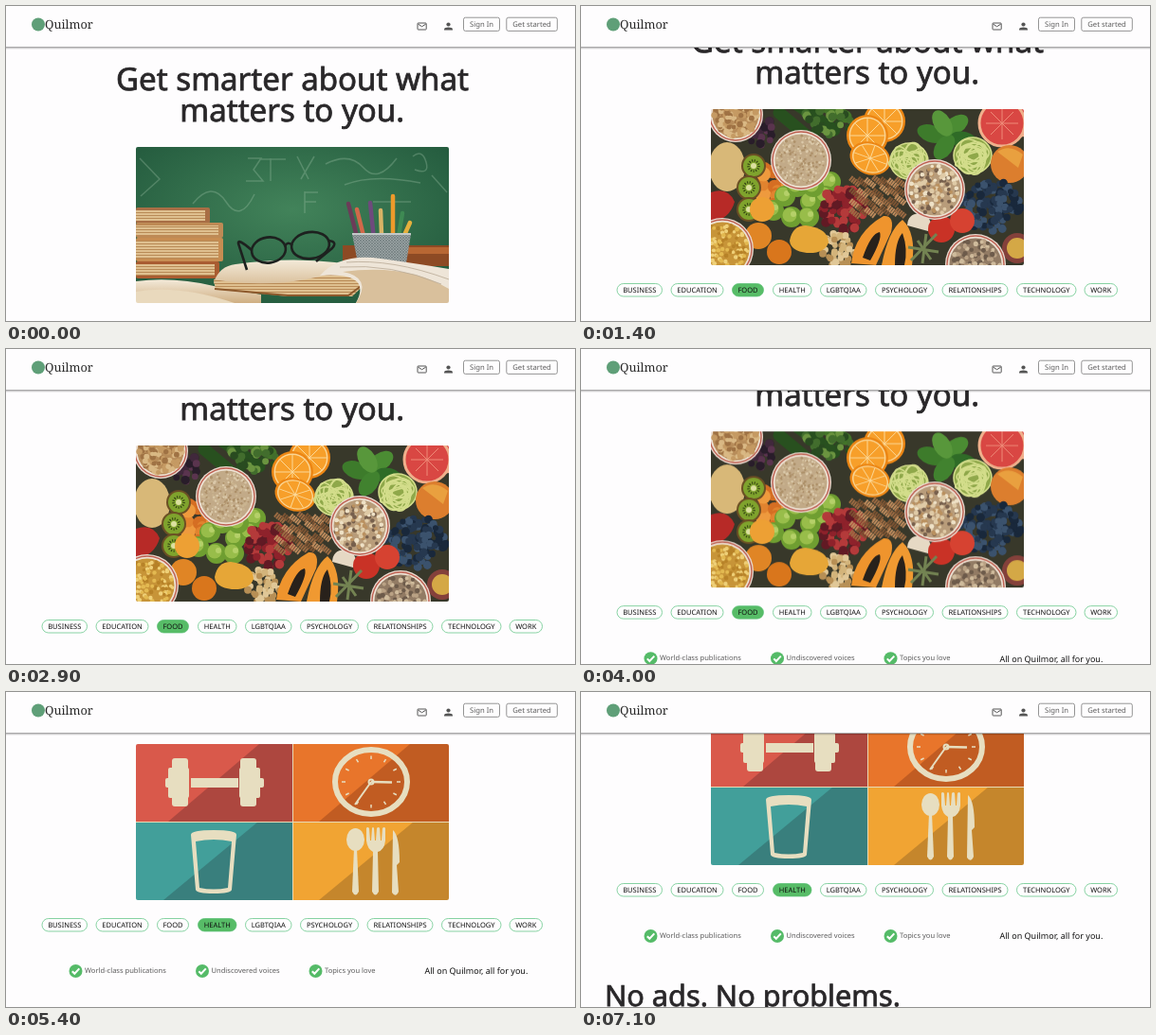
An HTML page that plays this animation: 600x333 px, repeating every 7.2 s.

```html
<!DOCTYPE html>
<html lang="en">
<head>
<meta charset="utf-8">
<title>Quilmor</title>
<style>
html, body { margin: 0; width: 100%; height: 100%; overflow: hidden; background: #fefdfe; }
svg { display: block; width: 100vw; height: 100vh; }
text { font-family: "Noto Sans", sans-serif; text-rendering: geometricPrecision; }
.title { font-size: 33.1px; fill: #292729; stroke: #292729; stroke-width: .75px; }
.mid { text-anchor: middle; }
.small { font-size: 7.56px; fill: #5c5c5c; }
.btn { fill: none; stroke: #888; stroke-width: .9px; }
.page { animation: scroll 7200ms infinite; }
.slide { animation: 7200ms step-end infinite; }
.education { animation-name: education; }
.food { animation-name: food; visibility: hidden; }
.health { animation-name: health; visibility: hidden; }
@keyframes education { 0% { visibility: visible; } 13.889%, 100% { visibility: hidden; } }
@keyframes food { 0% { visibility: hidden; } 13.889% { visibility: visible; } 69.444%, 100% { visibility: hidden; } }
@keyframes health { 0% { visibility: hidden; } 69.444%, 100% { visibility: visible; } }
@keyframes scroll {
  0% { transform: translateY(0); animation-timing-function: steps(9); }
  12.5% { transform: translateY(-36px); animation-timing-function: steps(4); }
  18.055% { transform: translateY(-40px); animation-timing-function: steps(4); }
  23.611% { transform: translateY(-40px); animation-timing-function: steps(7); }
  33.333% { transform: translateY(-47px); animation-timing-function: steps(8); }
  44.444% { transform: translateY(-47px); animation-timing-function: steps(7); }
  54.166% { transform: translateY(-60px); animation-timing-function: steps(6); }
  62.499% { transform: translateY(-71px); animation-timing-function: steps(4); }
  68.055% { transform: translateY(-80px); animation-timing-function: steps(5); }
  74.999% { transform: translateY(-94px); animation-timing-function: steps(10); }
  88.888% { transform: translateY(-117px); animation-timing-function: steps(7); }
  98.61%, 100% { transform: translateY(-131px); }
}
</style>
</head>
<body>
<svg viewBox="0 0 600 333" preserveAspectRatio="none">
  <defs>
    <clipPath id="frame"><rect width="330" height="165" rx="2"/></clipPath>
    <radialGradient id="board" cx=".5" cy=".4" r=".65">
      <stop offset="0" stop-color="#42835a"/><stop offset="1" stop-color="#245b3e"/>
    </radialGradient>
    <linearGradient id="paper" x2="0" y2="1">
      <stop offset="0" stop-color="#f3ead9"/><stop offset="1" stop-color="#cfae82"/>
    </linearGradient>
    <pattern id="edges" width="8" height="3" patternUnits="userSpaceOnUse">
      <rect width="8" height="3" fill="#dfc090"/><rect width="8" height="1" fill="#b88a56"/>
    </pattern>
    <pattern id="mesh" width="3" height="3" patternUnits="userSpaceOnUse">
      <rect width="3" height="3" fill="#9aa3a4"/><path d="M0 0L3 3M3 0L0 3" stroke="#697577" stroke-width=".6"/>
    </pattern>
    <g id="orange">
      <circle r="22" fill="#ec8614"/><circle r="19.5" fill="#fbd592"/><circle r="18" fill="#f79f2a"/>
      <path d="M-18 0H18M0-18V18M-12.7-12.7L12.7 12.7M12.7-12.7L-12.7 12.7" stroke="#fcd998"/>
    </g>
    <g id="kiwi"><circle r="13" fill="#6b4f24"/><circle r="11" fill="#7fa32d"/><circle r="5.5" fill="none" stroke="#2f3c12" stroke-width="2.5" stroke-dasharray="1 1.6"/><circle r="3" fill="#dbe0a0"/></g>
    <g id="check"><circle r="7" fill="#55bb68"/><path d="M-3.7 .2L-1.2 2.8L3.8-2.6" fill="none" stroke="#fff" stroke-width="2"/></g>
  </defs>

  <rect width="600" height="333" fill="#fefdfe"/>
  <g class="page">
    <text class="title mid" x="302" y="89">Get smarter about what</text>
    <text class="title mid" x="301.700" y="122">matters to you.</text>

    <g transform="translate(137 149)"><g clip-path="url(#frame)">
      <g class="slide education">
        <rect width="330" height="165" fill="url(#board)"/>
        <g fill="none" stroke="#a9c9b0" stroke-width="1.5" opacity=".3">
          <path d="M4 12L25 34L5 52M118 12H132L124 24L134 36H116M142 12V36M132 13H158M170 10L182 34M188 10L174 34M178 48H192M178 58H190M178 47V70M60 60Q80 35 95 58T125 50M200 18Q225 5 240 22T275 12M220 40Q250 28 300 38M292 10Q302 2 306 16T294 24M312 30L328 48M250 58H290"/>
        </g>
        <path d="M218 104H330V126H218Z" fill="#8d4a24"/>
        <path d="M283 106H330V113H283Z" fill="#b86733"/>
        <g id="stack"></g>
        <g id="pencils" stroke-width="4.5" stroke-linecap="round"></g>
        <path d="M228 92H290L285 123H234Z" fill="url(#mesh)"/>
        <path d="M228 92H290" stroke="#c3c9c8" stroke-width="2"/>
        <path d="M0 142Q40 137 82 147L132 156V165H0Z" fill="url(#paper)"/>
        <path d="M0 153Q45 145 104 165H0Z" fill="#e9d9bd"/>
        <path d="M82 143Q88 126 105 124Q160 116 210 122L260 132L200 156L85 151Z" fill="url(#paper)"/>
        <path d="M82 140Q140 150 194 137Q224 127 254 133L228 158H160L84 150Z" fill="url(#edges)"/>
        <path d="M83 150L160 157H224L252 136" fill="none" stroke="#8d592c" stroke-width="2"/>
        <path d="M194 136Q215 112 258 118T330 129V165H232Q250 132 194 136Z" fill="#eee5d8"/>
        <path d="M232 165Q250 138 218 132Q285 123 330 150V165Z" fill="#d9c09c"/>
        <path d="M222 122Q270 118 330 140M215 127Q270 123 322 145" fill="none" stroke="#b9aa96" stroke-width=".8"/>
        <g fill="none" stroke="#1d211f" stroke-width="2.6">
          <ellipse cx="140" cy="109" rx="18" ry="13.5" transform="rotate(-8 140 109)"/>
          <ellipse cx="184" cy="104" rx="20" ry="14" transform="rotate(-8 184 104)"/>
          <path d="M157 105Q160 99 165 104M122 109Q107 96 108 102L117 130M203 99Q213 100 207 107L190 121"/>
        </g>
      </g>

      <g class="slide food">
        <rect width="330" height="165" fill="#38382a"/>
        <g stroke-linecap="round" stroke-width="13">
          <path d="M72 4L108 34M92-4L130 22" stroke="#28501f"/><path d="M115-6L142 8" stroke="#437429"/>
        </g>
        <g id="leaves"></g>
        <g id="greens"></g>
        <ellipse cx="17" cy="61" rx="19" ry="26" fill="#d8b878"/>
        <g id="carrots"></g>
        <use href="#kiwi" x="45" y="60"/><use href="#kiwi" x="40" y="83"/><use href="#kiwi" x="40" y="106"/>
        <path d="M0 88Q18 82 25 98Q20 116 0 120Z" fill="#b72a27"/>
        <use href="#orange" x="183" y="13"/><use href="#orange" x="165" y="28"/><use href="#orange" transform="translate(168 52) rotate(20) scale(1 .78)"/>
        <g id="nests" fill="none" stroke="#d3dd8b" stroke-width="1.600"></g>
        <g stroke="#f0b08c" stroke-width="3" fill="#d94743">
          <circle cx="326" cy="5" r="23"/><circle cx="307" cy="15" r="24"/>
        </g>
        <path d="M290 15H324M307 0V32M295 3L319 27M319 3L295 27" stroke="#ef8b78"/>
        <circle cx="315" cy="58" r="20" fill="#dc7e2e"/><path d="M302 45Q315 36 329 48L324 62Z" fill="#e9a03f"/>
        <g id="clusters"></g>
        <path d="M83 139Q86 123 100 123Q124 126 124 141Q120 153 101 152Q84 150 83 139Z" fill="#e6a637"/>
        <path d="M148 163Q152 130 182 113Q194 112 190 130L174 165Z" fill="#ef942d"/>
        <path d="M180 165Q187 128 202 117Q217 131 212 165Z" fill="#f09931"/>
        <path d="M160 157Q169 131 178 130Q181 137 168 160ZM194 165Q194 140 202 131Q208 148 204 165Z" fill="#28211b"/>
        <circle cx="54" cy="106" r="13" fill="#eda034"/><circle cx="50" cy="134" r="14" fill="#e08525"/><circle cx="72" cy="151" r="13" fill="#d9761c"/>
        <path d="M207 123Q208 108 224 111Q237 119 229 129Z" fill="#e6d9c4"/>
        <circle cx="243" cy="127" r="14" fill="#c93226"/><circle cx="265" cy="118" r="13" fill="#d64231"/>
        <path d="M211 160L238 132M218 139L232 159M208 146L240 151M227 132L223 163" stroke="#738352" stroke-width="3"/>
        <circle cx="323" cy="147" r="16" fill="#84413b"/><circle cx="323" cy="147" r="11" fill="#d4a846"/>
        <g id="bowls"></g>
      </g>

      <g class="slide health">
        <path d="M0 0H165V82H0Z" fill="#d9594b"/><path d="M34 82L130 0H165V82Z" fill="#ad473f"/>
        <path d="M165 0H330V82H165Z" fill="#e8752b"/><path d="M193 82L289 0H330V82Z" fill="#c15c22"/>
        <path d="M0 82H165V165H0Z" fill="#429f9a"/><path d="M29 165L129 82H165V165Z" fill="#397f7d"/>
        <path d="M165 82H330V165H165Z" fill="#f1a433"/><path d="M193 165L293 82H330V165Z" fill="#c5862c"/>
        <path d="M165.5 0V165M0 82.5H330" stroke="#e8d9b4"/>
        <g fill="#e7dec0">
          <rect x="38" y="15" width="17" height="51" rx="3"/><rect x="34" y="25" width="22" height="32" rx="2"/><rect x="31" y="36" width="6" height="10" rx="2"/>
          <rect x="58" y="36" width="50" height="10"/>
          <rect x="110" y="15" width="17" height="51" rx="3"/><rect x="109" y="25" width="22" height="32" rx="2"/><rect x="129" y="36" width="6" height="10" rx="2"/>
          <path d="M58 96Q58 91 82 91T106 96L101 154Q100 158 82 158T63 154ZM63 103L67 152Q82 155 97 152L101 103Q82 99 63 103Z" fill-rule="evenodd"/>
          <ellipse cx="231.500" cy="101" rx="9.500" ry="12"/><path d="M230 110H233L235 156Q231.500 163 228 156Z"/>
          <path d="M243 89Q244 87 246 89L247 102H248L249 89Q250 87 251 89L252 102H253L254 89Q256 87 257 89L258 102H259L260 89Q262 87 263 89V102Q262 112 255 114L256 156Q252.500 163 249 156L250 114Q244 111 243 102Z"/>
          <path d="M271 91Q278 97 278 125L275 128L277 156Q274 163 270 157Z"/>
        </g>
        <g fill="none" stroke="#e7dec0">
          <ellipse cx="248" cy="40" rx="38" ry="34" stroke-width="6"/>
          <g id="ticks" stroke-width="1.500"></g>
          <path d="M248 40L270 40.500" stroke-width="2.500"/><path d="M248 40L231 64" stroke-width="2"/>
          <circle cx="248" cy="40" r="2.500" stroke-width="2"/>
        </g>
      </g>
    </g></g>

    <g id="pills"></g>
    <g id="perks"></g>
    <text x="441.500" y="392.400" font-size="9" fill="#111">All on Quilmor, all for you.</text>
    <text class="title" x="25" y="463" style="font-size:30.700px">No ads. No problems.</text>
  </g>

  <rect y="43" width="600" height="3" fill="#000" opacity=".06"/>
  <rect y="43" width="600" height="2" fill="#000" opacity=".14"/>
  <rect y="43" width="600" height="1" fill="#aaa"/>
  <rect width="600" height="43" fill="#fefdfe"/>
  <circle cx="34" cy="19.500" r="7" fill="#5f9f78"/>
  <text x="41" y="24" style="font:12.700px 'Noto Serif',serif" fill="#292929">Quilmor</text>
  <g fill="none" stroke="#555">
    <rect x="434" y="18" width="9.200" height="7" rx=".7"/><path d="M434.500 19L438.600 21.800L442.800 19"/>
  </g>
  <path d="M462 25.500V24.400Q462.500 22.500 466.500 22.500T471 24.400V25.500Z" fill="#555"/><circle cx="466.500" cy="19.500" r="2.100" fill="#555"/>
  <rect class="btn" x="482.500" y="12.200" width="38" height="14.200" rx="2"/>
  <rect class="btn" x="527.800" y="12.200" width="53.500" height="14.200" rx="2"/>
  <text class="small mid" x="501.500" y="22" style="font-size:7.700px">Sign In</text>
  <text class="small mid" x="554.500" y="22" style="font-size:7.700px">Get started</text>
</svg>
<script>
const put = (id, html) => { document.getElementById(id).innerHTML += html; };
const dot = (x, y, r, fill) => `<circle cx="${x}" cy="${y}" r="${r}" fill="${fill}"/>`;
let seed = 7;
const rand = () => (seed = seed * 16807 % 2147483647) / 2147483647;

// Random dots spread evenly over an ellipse
function scatter(id, cx, cy, rx, ry, count, size, colors) {
  let out = '';
  for (let i = 0; i < count; i++) {
    const a = rand() * Math.PI * 2, d = Math.sqrt(rand());
    const fill = colors[i % colors.length];
    out += dot((cx + Math.cos(a) * d * rx).toFixed(1), (cy + Math.sin(a) * d * ry).toFixed(1), size * (.8 + rand() * .4), fill);
  }
  put(id, out);
}

function pill(label, x, right) {
  const box = `x="${x}" y="333.500" width="${right - x}" height="13.500" rx="6.750"`;
  const slides = ['EDUCATION', 'FOOD', 'HEALTH'];
  const active = slides.includes(label) ? `<rect ${box} fill="#57bc67" class="slide ${label.toLowerCase()}"/>` : '';
  put('pills', `<rect ${box} fill="#fefdfe" stroke="#86d2a2"/>${active}
    <text class="mid" x="${(x + right) / 2}" y="343" font-size="7.500" fill="#111">${label}</text>`);
}
[['BUSINESS', 38, 85.5], ['EDUCATION', 95, 150], ['FOOD', 159.5, 192.5], ['HEALTH', 202.5, 243],
 ['LGBTQIAA', 252.5, 301], ['PSYCHOLOGY', 310.5, 371.5], ['RELATIONSHIPS', 381, 450],
 ['TECHNOLOGY', 459.5, 522], ['WORK', 531, 565.5]].forEach(p => pill(...p));

[['World-class publications', 73.5], ['Undiscovered voices', 207], ['Topics you love', 326.5]].forEach(([label, x]) =>
  put('perks', `<use href="#check" x="${x}" y="389"/><text class="small" x="${x + 9.5}" y="391.300">${label}</text>`));

[[64, 78, 17, '#a86e45'], [80, 92, 16, '#be8a55'], [96, 92, 25, '#c78d52'], [121, 88, 18, '#a95c31']].forEach(([y, w, h, c]) =>
  put('stack', `<rect y="${y}" width="${w}" height="${h}" rx="2" fill="${c}"/><rect y="${y + 3}" width="${w - 5}" height="${h - 6}" fill="url(#edges)"/>`));

[[224, 60, 239, '#6b3c58'], [233, 66, 246, '#d1694a'], [247, 59, 253, '#6e4a7d'], [258, 67, 260, '#d9b365'],
 [271, 52, 271, '#ed9a2b'], [281, 70, 273, '#3e8a53'], [289, 80, 272, '#e5b03d']].forEach(([x, y, base, c]) =>
  put('pencils', `<path d="M${x} ${y}L${base} 118" stroke="${c}"/>`));

const leaf = (x, y, a, c) => `<ellipse cx="${x}" cy="${y}" rx="15" ry="9" fill="${c}" transform="rotate(${a} ${x} ${y})"/>`;
put('leaves', leaf(232, 26, 20, '#3d7b2b') + leaf(258, 17, -35, '#4b8c33') + leaf(267, 33, 15, '#2f6b27') + leaf(246, 40, -55, '#41822f') + leaf(244, 15, 60, '#58973b'));

scatter('greens', 122, 12, 26, 16, 30, 4, ['#426d2d', '#6b9440', '#294b20']);
scatter('greens', 52, 23, 14, 16, 22, 4, ['#40283b', '#5a344e', '#291d2a']);
scatter('carrots', 65, 83, 14, 28, 24, 6.5, ['#e1832f', '#d56e23', '#ee9a3e']);

[[209, 55, 20, 19], [276, 49, 20, 19]].forEach(([x, y, rx, ry]) => {
  put('nests', `<ellipse cx="${x}" cy="${y}" rx="${rx}" ry="${ry}" fill="#8fa84a"/>`);
  for (let k = 0; k < 12; k++)
    put('nests', `<ellipse cx="${x + rand() * 12 - 6}" cy="${y + rand() * 10 - 5}" rx="${rx * .75}" ry="${ry * (.2 + rand() * .4)}" transform="rotate(${k * 31} ${x} ${y})"/>`);
});

[[66, 107], [78, 92], [91, 82], [105, 98], [85, 114], [126, 77], [121, 92], [103, 114], [108, 82]].forEach(([x, y]) =>
  put('clusters', dot(x, y, 11, '#6f9e31') + dot(x - 2, y - 2, 7.5, '#98bd4a') + dot(x + 2, y - 3, 3, '#b5d069')));
scatter('clusters', 140, 106, 24, 25, 70, 4.5, ['#8e222b', '#b43a3a', '#611a24']);
scatter('clusters', 134, 149, 18, 18, 55, 3.3, ['#d3b47b', '#b78f55', '#e0c797']);
scatter('clusters', 295, 102, 32, 27, 130, 3.8, ['#26384f', '#3b526d', '#19283b']);
for (let i = 0; i < 28; i++) {
  const x = 147 + i % 7 * 8, y = 70 + Math.floor(i / 7) * 11 + rand() * 5;
  put('clusters', `<path d="M${x} ${y}l10 8" stroke="${['#9c6b43', '#7d5433', '#bd8b5d'][i % 3]}" stroke-width="6" stroke-dasharray="2 .6"/>`);
}

[[26, 6, 28, '#b78c5a', ['#d9b884', '#c59a63', '#9f7244'], 2.8],
 [95, 54, 31, '#c2aa88', ['#dac8a9', '#ad9069', '#cbb590'], 1.2],
 [236, 85, 31, '#b89c7a', ['#dfcaa6', '#77604d', '#ba9160', '#eee1c6'], 2.2],
 [12, 148, 32, '#c79438', ['#e3b951', '#b78228', '#efd078'], 2],
 [279, 164, 31, '#927b64', ['#b9a184', '#6d5b4b', '#cfbb9c'], 2.2]].forEach(([x, y, r, base, colors, size]) => {
  put('bowls', dot(x, y, r + 1, '#eadbd0') + dot(x, y, r - .3, '#bd5f50') + dot(x, y, r - 1.7, '#eee2d4') + dot(x, y, r - 3.5, base));
  scatter('bowls', x, y, r - 5, r - 5, size < 2 ? 240 : 130, size, colors);
});

for (let i = 0; i < 12; i++) {
  const c = Math.cos(i * Math.PI / 6), s = Math.sin(i * Math.PI / 6);
  put('ticks', `<path d="M${248 + c * 27} ${40 + s * 24}L${248 + c * 31} ${40 + s * 27.5}"/>`);
}
</script>
</body>
</html>
```
